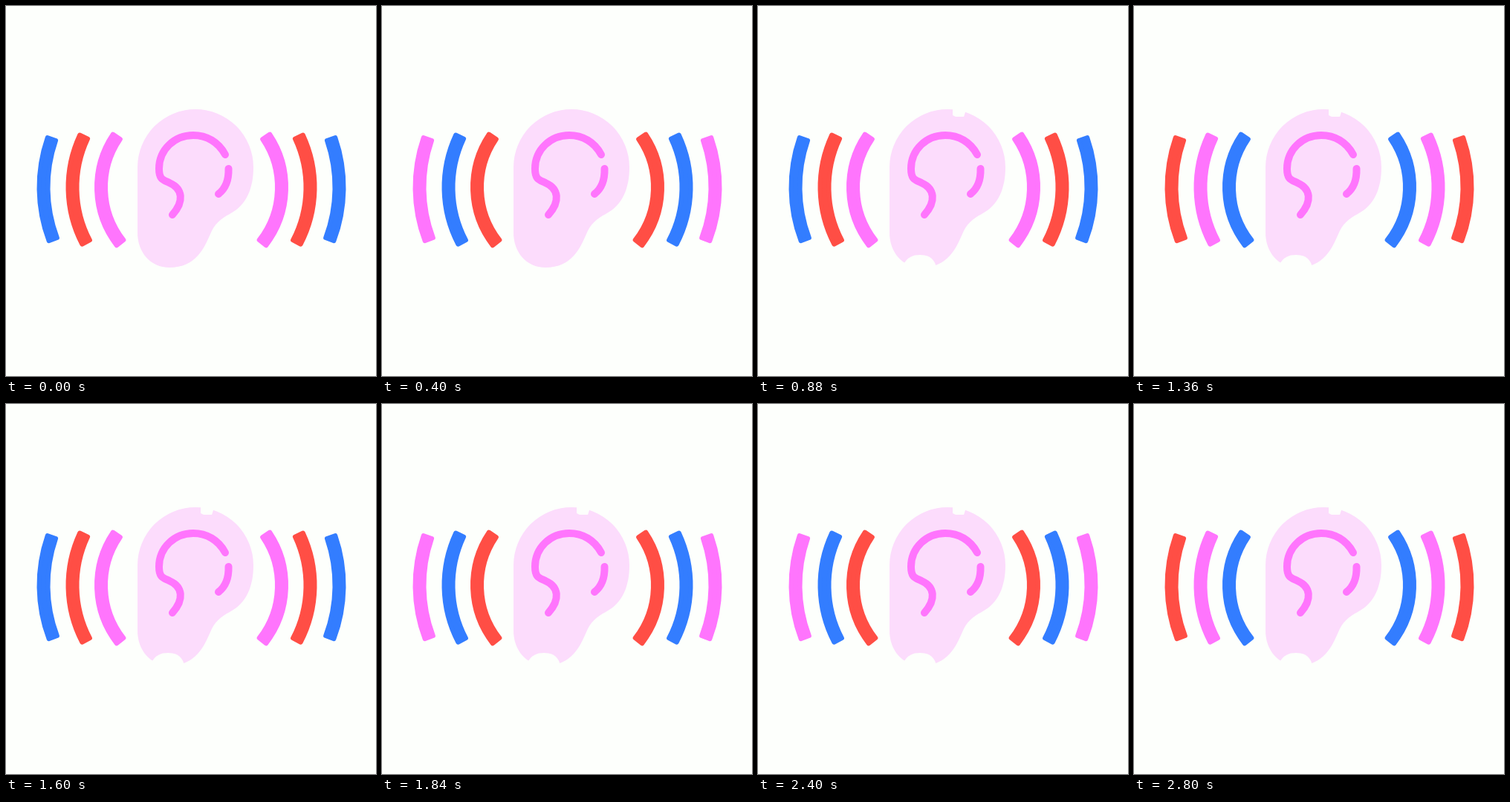
These frames come from a looping animation (498x498 px, 2.88 s). An HTML page with a canvas:

```html
<!DOCTYPE html>
<html lang="en">
<head>
<meta charset="utf-8">
<title>Listening ear</title>
<style>
  html, body { margin: 0; width: 100%; height: 100%; overflow: hidden; background: #fdfffc; }
  canvas { display: block; }
</style>
</head>
<body>
<canvas id="stage" width="498" height="498"></canvas>
<script>
const ctx = document.getElementById('stage').getContext('2d');
const LOOP = 2880, STEP = 240;
const BACKGROUND = '#fdfffc', PINK = '#ff75fd';
const COLORS = [PINK, '#ff4e45', '#337dff'];
const CENTER = { x: 249.5, y: 244 };
// Each ring: radius, then degrees above and below the horizontal axis
const RINGS = [[121.5, 35.5, 39.3], [160, 26.2, 28.6], [199, 19.9, 21.5]];

const ear = new Path2D('M177 217A78 78 0 0 1 333 217C333 245 324 268 301 280C288 287 281 293 275 307C267 325 256 352 220 352C194 352 177 331 177 305Z');
const folds = new Path2D('M295 200C286 183 270 174 252 174C227 174 206 193 206 219C206 234 212 234 220 238C238 246 240 263 224 281M299.5 219C300 235 295 246 286 253');
const topNotch = new Path2D('M262 137V147L266 149H277L279 143V137Z');
const bottomNotch = new Path2D('M196 347C202 338 208 335 218 335C228 335 235 338 239 348V354H196Z');

function drawBar(radius, up, down, color, side) {
  const corner = 3, half = 9 - corner;
  const from = -up * Math.PI / 180 + corner / radius;
  const to = down * Math.PI / 180 - corner / radius;
  ctx.save();
  ctx.translate(CENTER.x, CENTER.y);
  ctx.scale(side, 1);
  ctx.beginPath();
  ctx.arc(0, 0, radius + half, from, to);
  ctx.arc(0, 0, radius - half, to, from, true);
  ctx.closePath();
  ctx.fillStyle = ctx.strokeStyle = color;
  ctx.lineWidth = corner * 2;
  ctx.lineJoin = 'round';
  ctx.fill();
  ctx.stroke();
  ctx.restore();
}

function drawEar(time) {
  ctx.fillStyle = '#fcdcfc';
  ctx.fill(ear);
  ctx.strokeStyle = PINK;
  ctx.lineWidth = 10;
  ctx.lineCap = ctx.lineJoin = 'round';
  ctx.stroke(folds);
  ctx.fillStyle = BACKGROUND;
  if (time >= 2 * STEP) ctx.fill(topNotch);
  if (time >= 3 * STEP) ctx.fill(bottomNotch);
}

function draw() {
  const time = performance.now() % LOOP;
  const shift = Math.floor(time / STEP);
  ctx.fillStyle = BACKGROUND;
  ctx.fillRect(0, 0, 498, 498);
  drawEar(time);
  RINGS.forEach((ring, i) => {
    const color = COLORS[(i + shift) % COLORS.length];
    for (const side of [-1, 1]) drawBar(...ring, color, side);
  });
  requestAnimationFrame(draw);
}
draw();
</script>
</body>
</html>
```
